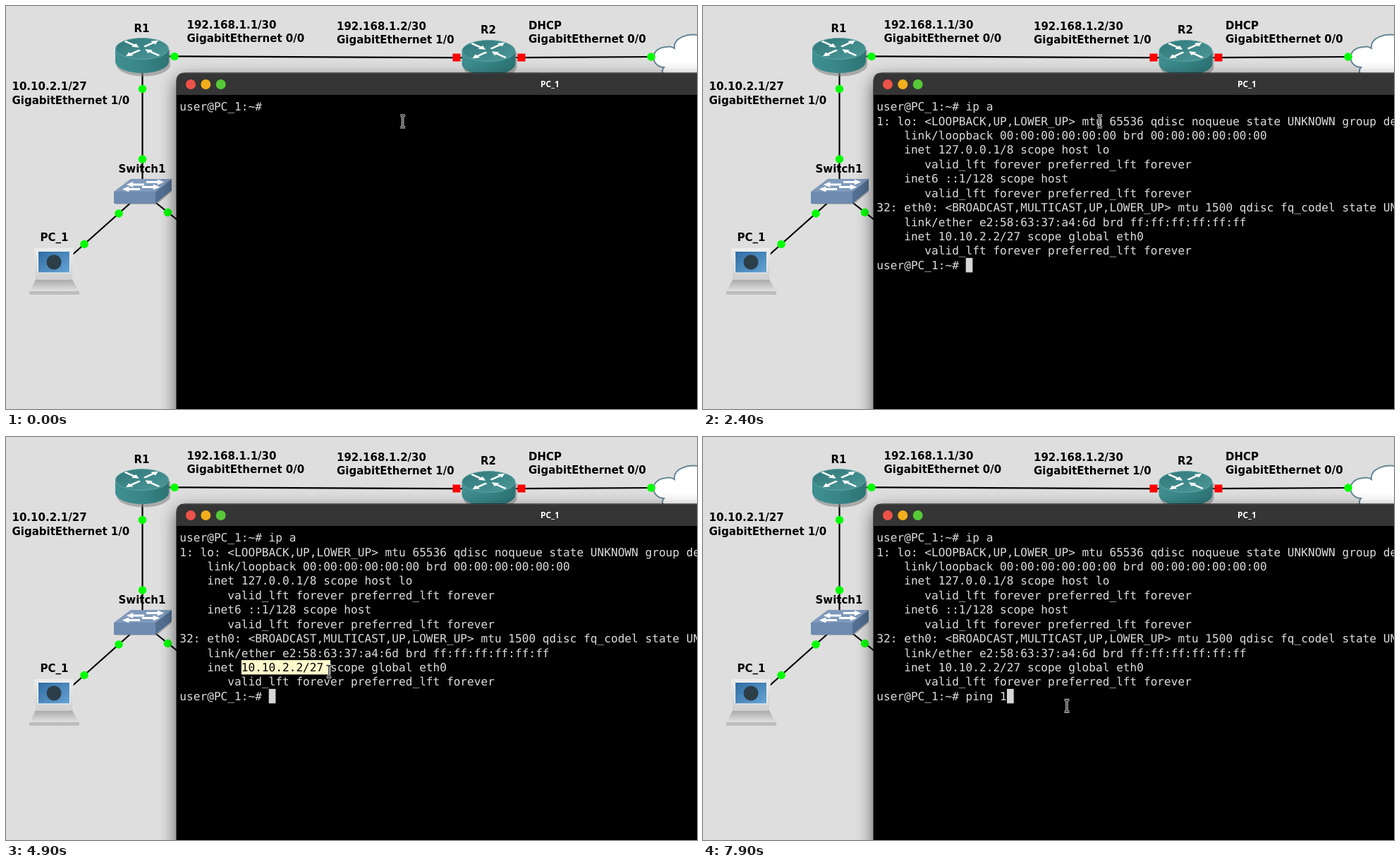
Write an HTML page that moves like this. It is 980 px wide and 571 px high and loops after 8 s.

```html
<!DOCTYPE html>
<html lang="en">
<head>
<meta charset="utf-8">
<title>Network lab terminal</title>
<style>
  html, body { margin: 0; width: 100%; height: 100%; overflow: hidden; background: #dedede; }
  svg { display: block; width: 980px; height: 571px; }
  .label { font: bold 15px "DejaVu Sans", sans-serif; fill: #000; }
  .mid { text-anchor: middle; }
  .title { font: bold 12px "Noto Sans", "Open Sans", sans-serif; fill: #fff; }
  .term text { font: 16.145px "DejaVu Sans Mono", monospace; fill: #dcdcdc;
               white-space: pre; text-rendering: geometricPrecision; }
  .term .picked { fill: #000; }
  .link { stroke: #000; stroke-width: 2.2; fill: none; }
  .up { fill: #0f0; }
  .down { fill: #f00; }
</style>
</head>
<body>
<svg viewBox="0 0 980 571">
  <defs>
    <linearGradient id="side">
      <stop offset="0" stop-color="#3f9092"/><stop offset=".5" stop-color="#388587"/><stop offset="1" stop-color="#2d7476"/>
    </linearGradient>
    <linearGradient id="lid" x2="1" y2="1">
      <stop offset="0" stop-color="#2f7779"/><stop offset="1" stop-color="#4f999a"/>
    </linearGradient>
    <linearGradient id="case" x2="0" y2="1">
      <stop offset="0" stop-color="#ececec"/><stop offset="1" stop-color="#cfcfcf"/>
    </linearGradient>
    <linearGradient id="keys" x2="0" y2="1">
      <stop offset="0" stop-color="#a4a4a4"/><stop offset="1" stop-color="#e4e4e4"/>
    </linearGradient>
    <linearGradient id="screen" x2="1" y2="1">
      <stop offset="0" stop-color="#2f6ca3"/><stop offset="1" stop-color="#66a3d4"/>
    </linearGradient>
    <filter id="blur" x="-10%" y="-10%" width="120%" height="120%"><feGaussianBlur stdDeviation="12"/></filter>
    <path id="arrow" d="M0-1.8H15V-5L24 0L15 5V1.8H0Z" fill="#fff"/>
    <g id="router">
      <path d="M-36 10V13A38 16 0 0 0 40 14V-8Z" fill="#888" opacity=".6"/>
      <path d="M-38-10V9A38 16 0 0 0 38 9V-10Z" fill="url(#side)"/>
      <ellipse cy="-9.500" rx="37.500" ry="15" fill="url(#lid)" stroke="#62a3a4"/>
      <g transform="translate(0 -10) scale(1.050 .6)">
        <use href="#arrow" transform="translate(3 -4) rotate(-38)"/>
        <use href="#arrow" transform="translate(-3 4) rotate(142)"/>
        <use href="#arrow" transform="translate(-23 -17) rotate(38)"/>
        <use href="#arrow" transform="translate(23 17) rotate(218)"/>
      </g>
    </g>
    <path id="beam" d="M-3.500-8.300H-2Q0-8.300 0-6.500Q0-8.300 2-8.300H3.500M0-6.500V6.500M-3.500 8.300H-2Q0 8.300 0 6.500Q0 8.300 2 8.300H3.500"/>
  </defs>

  <rect width="980" height="571" fill="#dedede"/>
  <path class="link" d="M193 71.200L684 73.300L918 72M193.500 70V264L68 375.800M194 264L260 316.500"/>

  <path d="M933 87C914 86 912 59 937 58C941 57 945 58 948 60C946 46 966 36 990 43V110H950C934 102 927 94 933 87Z" fill="#fff" stroke="#668795" stroke-width="2"/>
  <use href="#router" x="193" y="70"/>
  <use href="#router" x="684.500" y="73"/>

  <!-- switch -->
  <path d="M155 281H214L235 263V258L160 275Z" fill="#777" opacity=".5"/>
  <path d="M153 263L177 245H235L212 263Z" fill="#7f9abb"/>
  <path d="M153 263H212V280H153Z" fill="#6e8bb0"/>
  <path d="M212 263L235 245V261L212 280Z" fill="#536f92"/>
  <use href="#arrow" transform="translate(199 249.500) scale(1.050 .8)"/>
  <use href="#arrow" transform="translate(193 256.500) scale(1.050 .8)"/>
  <use href="#arrow" transform="translate(196 253) scale(-1.050 .8)"/>
  <use href="#arrow" transform="translate(190 259.500) scale(-1.050 .8)"/>

  <!-- workstation -->
  <path d="M43 386H93L104 405H33Z" fill="url(#keys)"/>
  <path d="M33 404H104V408Q104 409 102 409H35Q33 409 33 408Z" fill="#bdbdbd"/>
  <path d="M42 343H94Q96 343 96 345L94 386Q94 388 92 388H44Q42 388 42 386L40 345Q40 343 42 343Z" fill="url(#case)"/>
  <rect x="45.500" y="347.500" width="45" height="30.500" rx="1" fill="url(#screen)" stroke="#f6f6f6"/>
  <circle cx="68" cy="363" r="10.500" fill="#2c3e48"/>

  <g class="up">
    <circle cx="239" cy="71.500" r="5.800"/><circle cx="915" cy="72" r="5.800"/>
    <circle cx="193.500" cy="117.500" r="5.800"/><circle cx="193.500" cy="217" r="5.800"/>
    <circle cx="160" cy="294" r="5.800"/><circle cx="111" cy="337.500" r="5.800"/>
    <circle cx="229.500" cy="292.500" r="5.800"/>
  </g>
  <path class="down" d="M633.500 67.500h11v11h-11zM725.500 67.500h11v11h-11z"/>

  <g class="label">
    <text x="256.500" y="31.500">192.168.1.1/30</text>
    <text x="256.500" y="51">GigabitEthernet 0/0</text>
    <text x="469" y="33.500">192.168.1.2/30</text>
    <text x="469" y="53">GigabitEthernet 1/0</text>
    <text x="741" y="32.500">DHCP</text>
    <text x="741" y="52">GigabitEthernet 0/0</text>
    <text x="8.500" y="119">10.10.2.1/27</text>
    <text x="8.500" y="138.500">GigabitEthernet 1/0</text>
    <g class="mid">
      <text x="192.500" y="37">R1</text>
      <text x="684" y="39">R2</text>
      <text x="193" y="235.500">Switch1</text>
      <text x="68.500" y="333">PC_1</text>
    </g>
  </g>

  <!-- terminal window -->
  <rect x="242" y="103" width="1059" height="660" rx="12" opacity=".62" filter="url(#blur)"/>
  <path d="M241.500 571V107Q241.500 94.500 254 94.500H980V571Z" fill="#000"/>
  <path d="M242 126V107Q242 95 254 95H980V126Z" fill="#353535"/>
  <path d="M242 107Q242 95.500 254 95.500H980" fill="none" stroke="#474747"/>
  <circle cx="262" cy="111" r="7" fill="#ed5249"/>
  <circle cx="283.300" cy="111" r="7" fill="#f2ae1c"/>
  <circle cx="304.700" cy="111" r="7" fill="#57c838"/>
  <text class="title mid" x="771.500" y="115">PC_1</text>

  <g id="marks" fill="#fff8cc"></g>
  <rect id="caret" width="9.700" height="20.500" fill="#d6d6d6"/>
  <g id="rows" class="term"></g>
  <g id="pointer" fill="none" stroke-linejoin="round">
    <use href="#beam" stroke="#e2e2e2" stroke-width="3.300"/>
    <use href="#beam" stroke="#111" stroke-width="1.200"/>
  </g>
</svg>
<script>
const LOOP = 8000, X0 = 246.35, Y0 = 132.3, CELL = 9.72, LINE = 20.42;
const PROMPT = 'user@PC_1:~# ';
const LIFETIME = '       valid_lft forever preferred_lft forever';
const OUTPUT = [
  '1: lo: <LOOPBACK,UP,LOWER_UP> mtu 65536 qdisc noqueue state UNKNOWN group default qlen 1000',
  '    link/loopback 00:00:00:00:00:00 brd 00:00:00:00:00:00',
  '    inet 127.0.0.1/8 scope host lo',
  LIFETIME,
  '    inet6 ::1/128 scope host',
  LIFETIME,
  '32: eth0: <BROADCAST,MULTICAST,UP,LOWER_UP> mtu 1500 qdisc fq_codel state UNKNOWN group default',
  '    link/ether e2:58:63:37:a4:6d brd ff:ff:ff:ff:ff:ff',
  '    inet 10.10.2.2/27 scope global eth0',
  LIFETIME
];

// Each track holds [time, value...] until its next entry.
const typed = [[0, ''], [800, 'i'], [1300, 'ip'], [1600, 'ip '], [2000, 'ip a'], [2400, ''],
  [6900, 'p'], [7100, 'pi'], [7300, 'ping'], [7400, 'ping '], [7900, 'ping 1']];
const blink = [[0, 0], [100, 1], [600, 0], [800, 1], [3100, 0], [3700, 1], [6600, 0], [6900, 1]];
const mouse = [[0, 562.7, 163.5], [2800], [3400, 549, 193], [3500, 498, 228], [3600, 432, 278],
  [3700, 363, 318], [3800, 330.5, 329], [4000, 332, 329.3], [4100, 333, 330],
  [4300, 375, 331], [4400, 416, 332], [4500, 444, 335], [4600, 459, 339],
  [4900, 458, 332], [5000, 453, 329], [5400, 451, 329],
  [5900, 476, 348], [6000, 496, 364], [6100, 510, 376], [6200, 516, 381]];
// End columns of the selection on the address row and the row below it.
const FIRST = 9, ROW = 9;
const picked = [[0, 0, 0], [4300, 11, 0], [4400, 14, 0], [4500, 19, 0], [4600, 39, 22],
  [4900, 22, 0], [5000, 21, 0], [6100, 0, 0]];

const $ = id => document.getElementById(id);
const at = (track, t) => track.findLast(step => step[0] <= t);
const make = (tag, parent, attrs = {}) => {
  const el = document.createElementNS('http://www.w3.org/2000/svg', tag);
  for (const k in attrs) el.setAttribute(k, attrs[k]);
  return parent.appendChild(el);
};

const rows = Array.from({ length: 12 }, (_, i) => {
  const text = make('text', $('rows'), { x: X0, y: Y0 + 15.9 + i * LINE });
  return [make('tspan', text), make('tspan', text, { class: 'picked' }), make('tspan', text)];
});
const marks = [0, 1].map(i => make('rect', $('marks'), {
  x: X0 + (i ? 0 : FIRST) * CELL, y: Y0 + (ROW + i) * LINE, height: LINE
}));

function setRow(i, text, from = 0, to = 0) {
  [text.slice(0, from), text.slice(from, to), text.slice(to)].forEach((s, k) => {
    if (rows[i][k].textContent !== s) rows[i][k].textContent = s;
  });
}

function draw(t) {
  const done = t >= 2400, line = PROMPT + at(typed, t)[1];
  const [, end, below] = at(picked, t);
  const active = done ? 11 : 0;
  setRow(0, done ? PROMPT + 'ip a' : line);
  OUTPUT.forEach((text, i) => {
    const n = i + 1, shown = done ? text : '';
    if (n === ROW && end) setRow(n, shown, FIRST, end);
    else setRow(n, shown, 0, n === ROW + 1 ? below : 0);
  });
  setRow(11, done ? line : '');
  marks[0].setAttribute('width', Math.max(0, end - FIRST) * CELL);
  marks[1].setAttribute('width', below * CELL);

  const caret = $('caret');
  caret.setAttribute('x', X0 + line.length * CELL);
  caret.setAttribute('y', Y0 + active * LINE);
  caret.style.opacity = at(blink, t)[1];

  const [, x, y] = at(mouse, t), pointer = $('pointer');
  pointer.style.opacity = x ? 1 : 0;
  if (x) pointer.setAttribute('transform', `translate(${x} ${y})`);
}

const start = performance.now();
function tick() {
  draw((performance.now() - start) % LOOP);
  requestAnimationFrame(tick);
}
tick();
</script>
</body>
</html>
```
